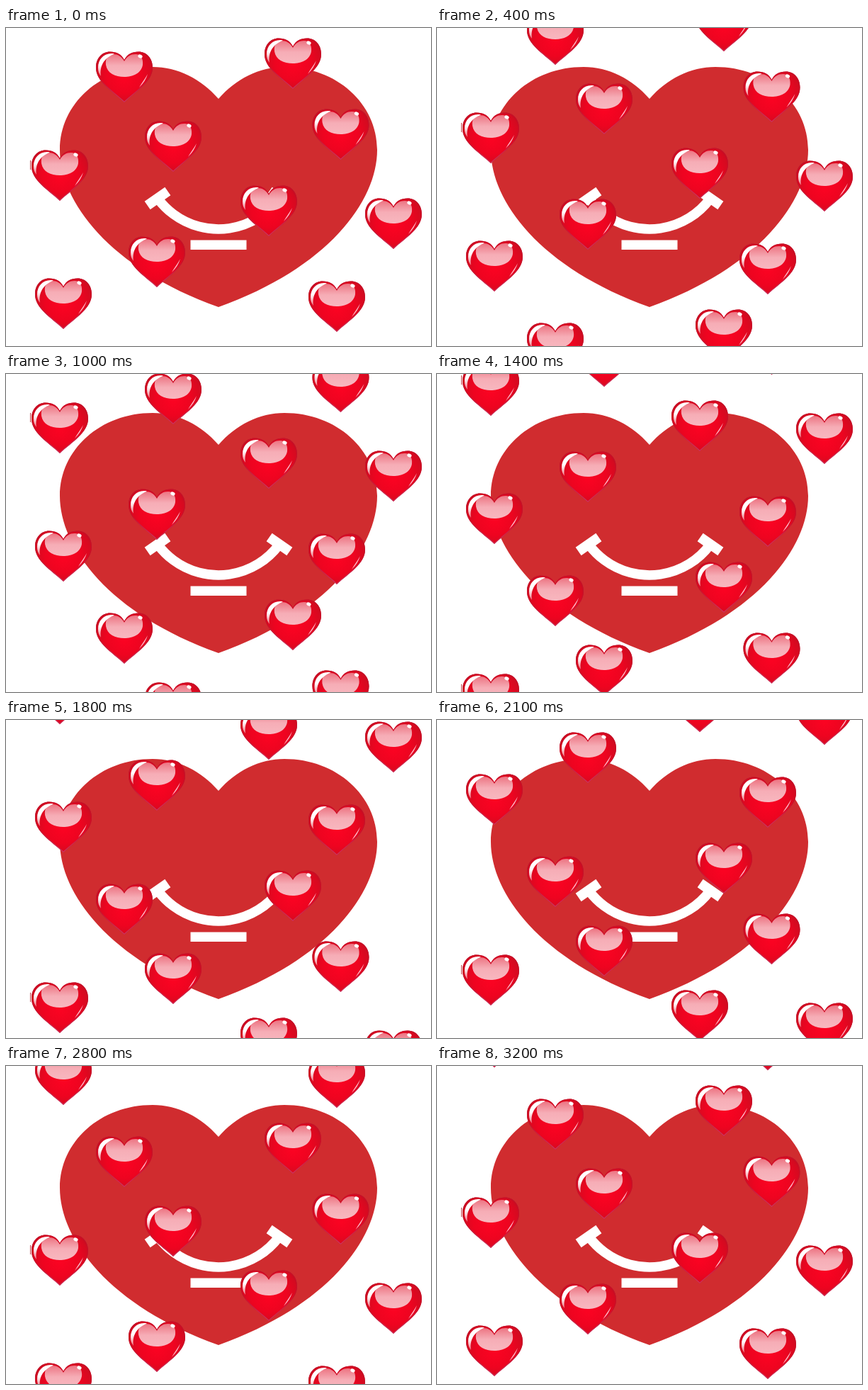
Recreate the animation shown at these times as an HTML page with a canvas. Size 600x449 px, loop 3300 ms.

```html
<!DOCTYPE html>
<html lang="en">
<head>
<meta charset="utf-8">
<title>Floating hearts</title>
<style>
  html, body { margin: 0; width: 100%; height: 100%; overflow: hidden; background: #fff; }
  canvas { display: block; }
</style>
</head>
<body>
<canvas id="stage" width="600" height="449"></canvas>
<script>
const ctx = document.getElementById('stage').getContext('2d');
const LOOP = 3300, STEP = 100, STEPS = LOOP / STEP;
const RISE = 436;   // height of the repeating pattern
const RED = '#d02c2f';

// centre x and top y of each small heart at the start
const hearts = [
  [405, 14], [167, 33], [472.5, 114], [236, 131], [76, 172],
  [371, 222], [547, 240], [213, 294], [81, 353], [467, 357]
];

const bigHeart = new Path2D(
  'M300 100C276 72 242 55 207 55C133 55 76 107 76 172' +
  'C76 245 146 339 300 394C454 339 524 245 524 172' +
  'C524 107 467 55 393 55C358 55 324 72 300 100Z');

const body = new Path2D(
  'M0 12C4 4 11 .5 20 .5C32 .5 40 10 40 23C40 43 17 56 0 72' +
  'C-17 56 -40 43 -40 23C-40 10 -32 .5 -20 .5C-11 .5 -4 4 0 12Z');

const gloss = new Path2D(
  'M0 14C4 7 9 4 16 4C23 4 27 10 26 19C24 31 12 36 0 36' +
  'C-13 36 -24 31 -26 19C-27 10 -23 4 -16 4C-9 4 -4 7 0 14Z');

const leftShine = new Path2D(
  'M-14 3.5C-27 1 -37 10 -37 23C-37 28 -36 31 -33 35C-35 22 -30 10 -14 3.5Z');

const rightShine = new Path2D('M33 32C31 39 27 45 21 51C25 44 29 39 33 32Z');

function linear(y0, y1, ...colors) {
  const g = ctx.createLinearGradient(0, y0, 0, y1);
  colors.forEach((c, i) => g.addColorStop(i / (colors.length - 1), c));
  return g;
}

const bodyFill = ctx.createRadialGradient(0, 38, 3, 0, 32, 46);
bodyFill.addColorStop(0, '#fa0322');
bodyFill.addColorStop(0.5, '#ee0420');
bodyFill.addColorStop(0.85, '#d50a20');
bodyFill.addColorStop(1, '#b90e22');
const rimFill = linear(0, 72, '#c4122a', '#c4122a', '#c93a68');
const glossFill = linear(4, 36, '#ec7482', '#f6adb6', '#f8b7bf');
const shineFill = linear(2, 36, '#fff', '#fff', 'rgba(255,205,212,.6)');

function fill(path, color) {
  ctx.fillStyle = color;
  ctx.fill(path);
}

function drawHeart(x, y) {
  ctx.save();
  ctx.translate(x, y);
  fill(body, bodyFill);
  ctx.save();
  ctx.clip(body);
  ctx.lineWidth = 2;
  ctx.strokeStyle = rimFill;
  ctx.stroke(body);
  ctx.restore();
  fill(gloss, glossFill);
  fill(leftShine, shineFill);
  fill(rightShine, '#ffb9c9');
  ctx.fillStyle = '#fff';
  ctx.beginPath();
  ctx.ellipse(22.5, 7, 3.2, 2.4, 0.4, 0, 7);
  ctx.fill();
  ctx.restore();
}

function drawCap(side) {
  ctx.save();
  ctx.translate(300 + side * 86, 240.5);
  ctx.rotate(side * 0.61);
  ctx.fillRect(-17.5, -7, 35, 14);
  ctx.restore();
}

function drawFace() {
  fill(bigHeart, RED);
  ctx.strokeStyle = ctx.fillStyle = '#fff';
  ctx.lineWidth = 13.5;
  ctx.beginPath();
  ctx.arc(300, 177.5, 106.5, 0.64, Math.PI - 0.64);
  ctx.stroke();
  drawCap(-1);
  drawCap(1);
  ctx.fillRect(260.5, 299.5, 79, 13.5);
}

function draw(step) {
  ctx.fillStyle = '#fff';
  ctx.fillRect(0, 0, 600, 449);
  drawFace();
  ctx.save();
  ctx.beginPath();
  ctx.rect(34, 0, 553, 449);
  ctx.clip();
  const shift = Math.round(step * RISE / STEPS);
  for (const [x, top] of hearts) {
    const y = (top - shift + RISE) % RISE;
    for (const copy of [y - RISE, y, y + RISE]) {
      if (copy < -74 || copy > 449) continue;
      drawHeart(x, copy);
      // thin sliver on the pattern's left edge
      if (x === 76) {
        ctx.fillStyle = '#c04a52';
        ctx.fillRect(34, copy + 15, 1, 13);
      }
    }
  }
  ctx.restore();
}

const start = performance.now();
function tick() {
  const t = Math.max(0, performance.now() - start) % LOOP;
  draw(Math.floor(t / STEP));
  requestAnimationFrame(tick);
}
tick();
</script>
</body>
</html>
```
